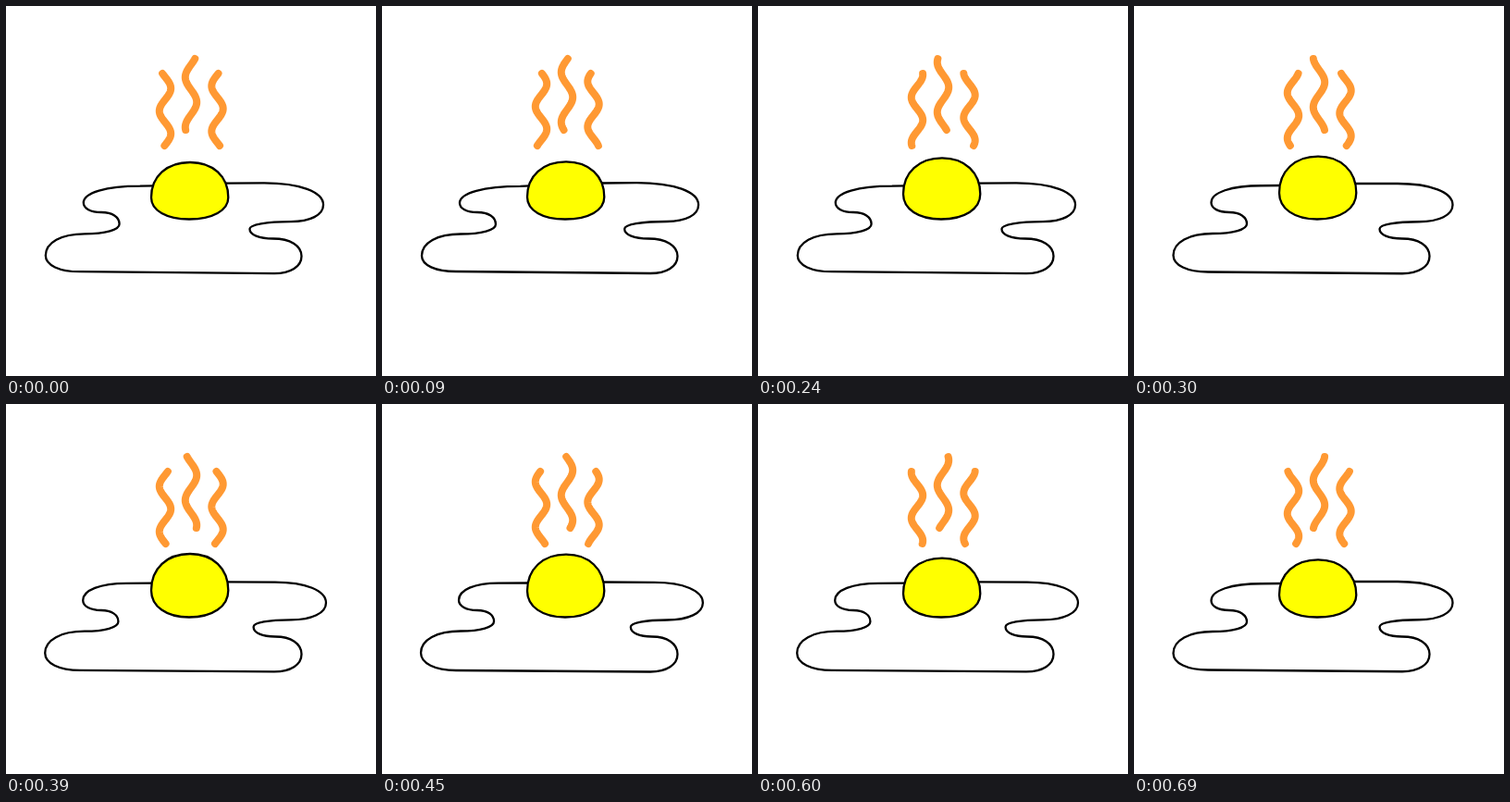
An HTML page with a canvas that plays this animation: 400 by 400 pixels, repeating every 0.75 s.

```html
<!DOCTYPE html>
<html lang="en">
<head>
<meta charset="utf-8">
<title>Fried egg</title>
<style>
html, body { margin: 0; width: 100%; height: 100%; overflow: hidden; background: #fff; }
canvas { display: block; width: 400px; height: 400px; }
</style>
</head>
<body>
<canvas id="stage" width="400" height="400"></canvas>
<script>
const ctx = document.getElementById('stage').getContext('2d');
const LOOP = 750, PAIR = 150, LONG = 90, STEPS = 10;
const TAU = Math.PI * 2;
const ROUND = 0.6;

// drawings are held for 90 and 60 ms in turn
const stepAt = t => 2 * Math.floor(t / PAIR) + (t % PAIR >= LONG ? 1 : 0);

// swings 0 -> 1 -> 0 once per loop
const swing = (step, low) => (1 - Math.cos(TAU * (step - low) / STEPS)) / 2;

function ink(color, width) {
  ctx.strokeStyle = color;
  ctx.lineWidth = width;
  ctx.stroke();
}

// quarter turns between points whose tangents alternate: level, upright, level...
function turns(pts) {
  ctx.lineTo(...pts[0]);
  for (let i = 1; i < pts.length; i++) {
    const [x0, y0] = pts[i - 1], [x1, y1] = pts[i];
    const dx = (x1 - x0) * ROUND, dy = (y1 - y0) * ROUND;
    if (i % 2) ctx.bezierCurveTo(x0 + dx, y0, x1, y1 - dy, x1, y1);
    else ctx.bezierCurveTo(x0, y0 + dy, x1 - dx, y1, x1, y1);
  }
}

// s: how far the white has spread
function drawWhite(s) {
  ctx.beginPath();
  ctx.moveTo(160, 194.5 - s);
  turns([
    [150 - 25 * s, 195 - 1.5 * s], [84 - s, 213 - s], [103, 223], [123 - 2 * s, 236 - s],
    [85, 246.5 - s], [43 - s, 270 - s], [80, 287 + s]
  ]);
  turns([
    [290, 289 + 0.5 * s], [319.5, 270.5], [288 + 4 * s, 251.5], [262 + 7 * s, 241],
    [308, 233 + 0.5 * s], [342 + 5 * s, 215], [275 + 20 * s, 191 + 2 * s]
  ]);
  ctx.lineTo(237, 191.5 + s);
  ink('#000', 2.3);
}

function drawYolk(rise) {
  const top = [199, 169 - rise], side = 207 - 0.8 * rise;
  ctx.beginPath();
  turns([top, [240.3, side], [198, 230.5], [157, side], top]);
  ctx.closePath();
  ctx.fillStyle = '#ff0';
  ctx.fill();
  ink('#000', 2.3);
}

// a wave that climbs one wavelength per loop
function drawWisp(x, top, bottom, crest, wave, step) {
  ctx.beginPath();
  for (let y = top; y <= bottom; y++) {
    const phase = (y - crest) / wave + step / STEPS;
    ctx.lineTo(x + 6.2 * Math.cos(TAU * phase), y);
  }
  ink('#ff9933', 8);
}

function draw(now) {
  const step = stepAt(now % LOOP);
  ctx.fillStyle = '#fff';
  ctx.fillRect(0, 0, 400, 400);
  ctx.lineCap = ctx.lineJoin = 'round';
  drawWhite(swing(step, 1.5));
  drawYolk(7 * swing(step, 0));
  drawWisp(172, 73, 151, 89, 49, step);
  drawWisp(200, 57, 134, 104, 54, step);
  drawWisp(228.5, 73, 151, 111, 49, step);
}

let start;
function tick(now) {
  start ??= now;
  draw(now - start);
  requestAnimationFrame(tick);
}
draw(0);
requestAnimationFrame(tick);
</script>
</body>
</html>
```
